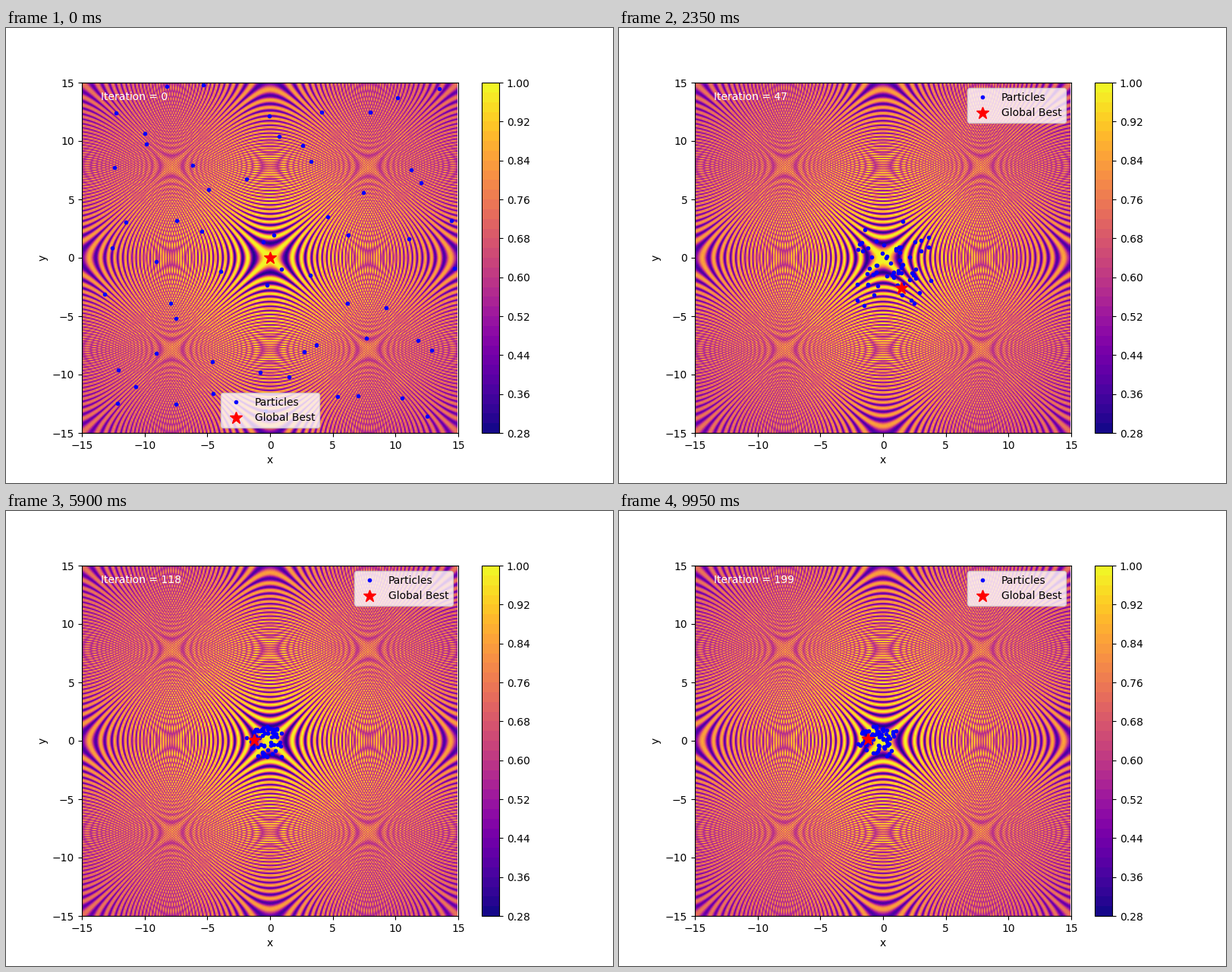
These frames come from a looping animation (800x600 px, 10 s). A matplotlib script:

```python
import numpy as np
import matplotlib.pyplot as plt
from matplotlib.animation import FuncAnimation

FRAMES, INTERVAL = 200, 50
LIM = 15
COLS, ROWS = 10, 6

# (first iteration, x, y) of each best point found
BEST = [(0, 0, 0), (1, 1.48, -2.59), (50, 0.25, 1.27),
        (75, -1.25, 0.05), (120, -1.2, 0.03), (160, -1.22, 0.15)]


def schaffer4(x, y):
    wave = np.cos(np.sin(np.abs(x**2 - y**2)))**2
    return 0.5 + (wave - 0.5) / (1 + 0.001 * (x**2 + y**2))**2


def best_at(i):
    return np.array([b[1:] for b in BEST if b[0] <= i][-1])


def swarm_path(seed=4):
    """Particle positions for every iteration, shape (FRAMES, count, 2)."""
    rng = np.random.default_rng(seed)
    count = COLS * ROWS

    # Scatter one particle in each cell of a coarse grid.
    cells = np.array([(c, r) for c in range(COLS) for r in range(ROWS)])
    pos = (cells + rng.random((count, 2))) / (COLS, ROWS) * 2 * LIM - LIM

    # Personal bests lie on the innermost valley, |x^2 - y^2| = pi / 2.
    u = rng.uniform(-0.8, 0.8, count)
    side = rng.choice([-1, 1], count)
    own = np.sqrt(np.pi / 2) * np.column_stack([side * np.cosh(u), np.sinh(u)])
    flip = rng.random(count) < 0.5
    own[flip] = own[flip, ::-1]

    rate = rng.uniform(0.027, 0.045, (count, 1))
    phase = rng.uniform(0, 2 * np.pi, (count, 2))
    speed = rng.uniform(0.05, 0.15, (count, 2))

    path = [pos]
    for i in range(1, FRAMES):
        goal = 0.4 * best_at(i) + 0.6 * own + np.sin(speed * i + phase)
        pos = pos + rate * (goal - pos)
        path.append(pos)
    return np.array(path)


path = swarm_path()

fig, ax = plt.subplots(figsize=(8, 6), dpi=100)
grid = np.arange(-LIM, LIM, 0.1)
X, Y = np.meshgrid(grid, grid)
field = ax.contourf(X, Y, schaffer4(X, Y), levels=np.linspace(0.28, 1, 37),
                    cmap="plasma")
fig.colorbar(field, ax=ax)
ax.set(xlim=(-LIM, LIM), ylim=(-LIM, LIM), xlabel="x", ylabel="y")

# The field never changes: render it once and reuse it as an image
# placed behind the axes.
fig.canvas.draw()
backdrop = np.array(fig.canvas.buffer_rgba())[72:534, 100:596]
field.set_visible(False)
ax.patch.set_visible(False)
fig.figimage(backdrop, xo=100, yo=66, zorder=-1)

dots, = ax.plot([], [], "bo", markersize=3, label="Particles")
star, = ax.plot([], [], "r*", markersize=12, label="Global Best")
label = ax.text(0.05, 0.95, "", color="white", transform=ax.transAxes)
legend = ax.legend(loc="upper right")


def update(i):
    dots.set_data(*path[i].T)
    star.set_data(*best_at(i)[:, None])
    label.set_text(f"Iteration = {i}")
    # The legend takes its corner once the particles have left it.
    legend.set_loc("lower center" if i < 6 else "upper right")
    return dots, star, label, legend


anim = FuncAnimation(fig, update, frames=FRAMES, interval=INTERVAL,
                     repeat=True, repeat_delay=0)
plt.show()
```
